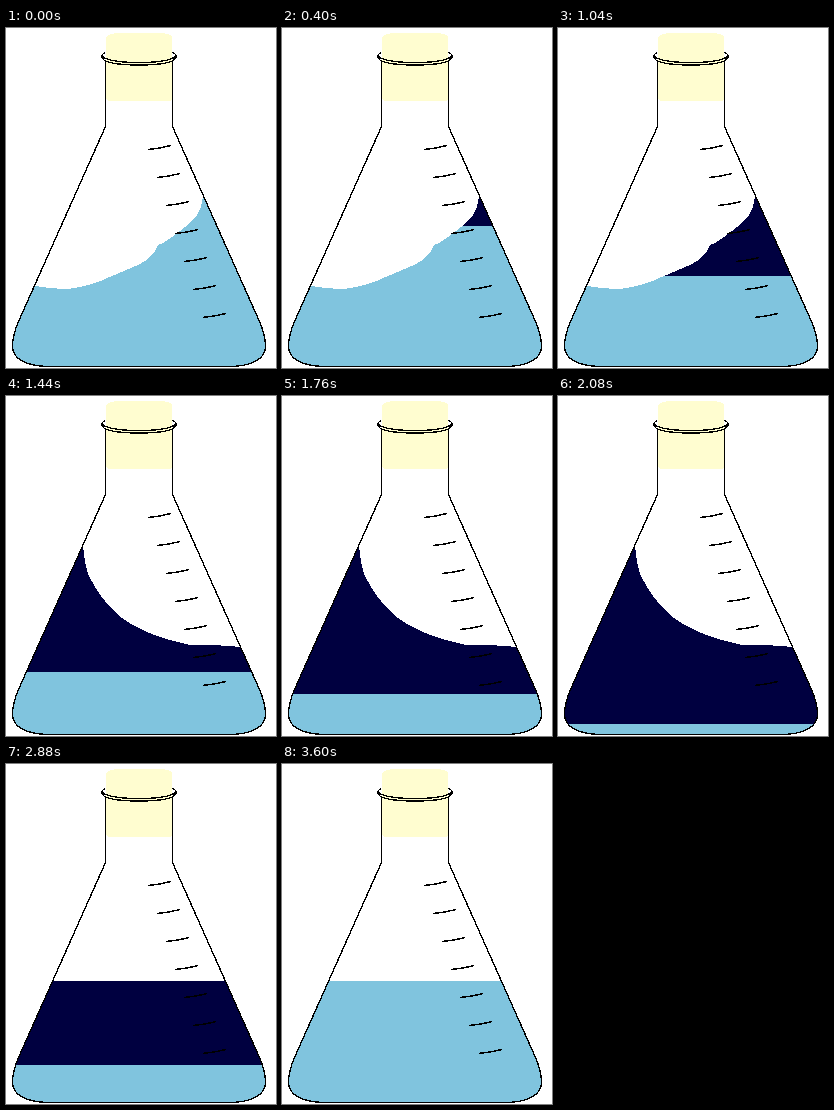
An HTML page for the animation above (3.68 s loop, 270 px wide and 340 px high).

```html
<!DOCTYPE html>
<html>
<head>
<meta charset="utf-8">
<style>
  html, body { margin: 0; width: 270px; height: 340px; overflow: hidden; background: #fff; }
  svg { display: block; shape-rendering: crispEdges; }
</style>
</head>
<body>
<svg width="270" height="340">
  <defs>
    <path id="body" d="M99 98 L12 293 Q6 307 6 318 C6 330 19 338 44 338 H222 C246 338 259 330 259 318 Q259 307 253 293 L166 98"/>
    <clipPath id="inside"><use href="#body" x=".5" y=".5"/></clipPath>
  </defs>
  <g clip-path="url(#inside)">
    <rect y="140" width="270" height="200" fill="#000040"/>
    <rect id="light" width="270" height="200" fill="#80c4de"/>
    <path id="air" fill="#fff"/>
  </g>
  <path fill="#fffdd0" d="M100 9 Q102 5 116 5 H151 Q165 5 166 9 V71 L164 73 H102 L100 71Z"/>
  <g fill="none" stroke="#000" stroke-width="1.35" transform="translate(.5 .5)">
    <use href="#body"/>
    <path d="M99 31 V98 M166 31 V98"/>
    <path d="M99 24 Q92 27 98 32 C110 38 155 38 167 32 Q173 27 166 24 M96 28 C106 36 159 36 169 28"/>
    <path id="ticks" stroke-width="1.5"/>
  </g>
</svg>
<script>
const FRAME = 80, COUNT = 46, SETTLED = 28;
const $ = id => document.getElementById(id);

// lower edge of the air above the liquid
const rightHigh = 'M0 258 H29 Q45 261 62 261 Q85 258 106 248 L132 237 Q148 229 152 217 ' +
  'L157 215 Q176 203 189 190 Q196 181 197 167 L270 167 V0 H0Z';
const leftHigh = 'M0 149 H77 Q79 171 83 180 Q95 205 116 222 Q139 239 180 248 L183 249 H208 L236 251 H270 V0 H0Z';
const flat = 'M0 217 H270 V0 H0Z';

// frame, height of the colour boundary
const levels = [[0, 167], [5, 198], [13, 248], [18, 276], [21, 290], [26, 328], [28, 339],
  [31, 339], [36, 301], [38, 281], [45, 217]];

function levelAt(k) {
  const i = Math.max(1, levels.findIndex(p => p[0] >= k));
  const [k0, y0] = levels[i - 1], [k1, y1] = levels[i];
  return Math.round(y0 + (y1 - y0) * (k - k0) / (k1 - k0));
}

let marks = '';
for (let i = 0; i < 7; i++) marks += `M${141.5 + 9.1 * i} ${121 + 28 * i} q12 -1 23 -4 `;
$('ticks').setAttribute('d', marks);

function draw(now) {
  const k = Math.floor(now / FRAME) % COUNT;
  $('light').setAttribute('y', levelAt(k));
  $('air').setAttribute('d', k >= SETTLED ? flat : k % 4 < 2 ? rightHigh : leftHigh);
}

const start = performance.now();
function tick() {
  draw(performance.now() - start);
  requestAnimationFrame(tick);
}
tick();
</script>
</body>
</html>
```
